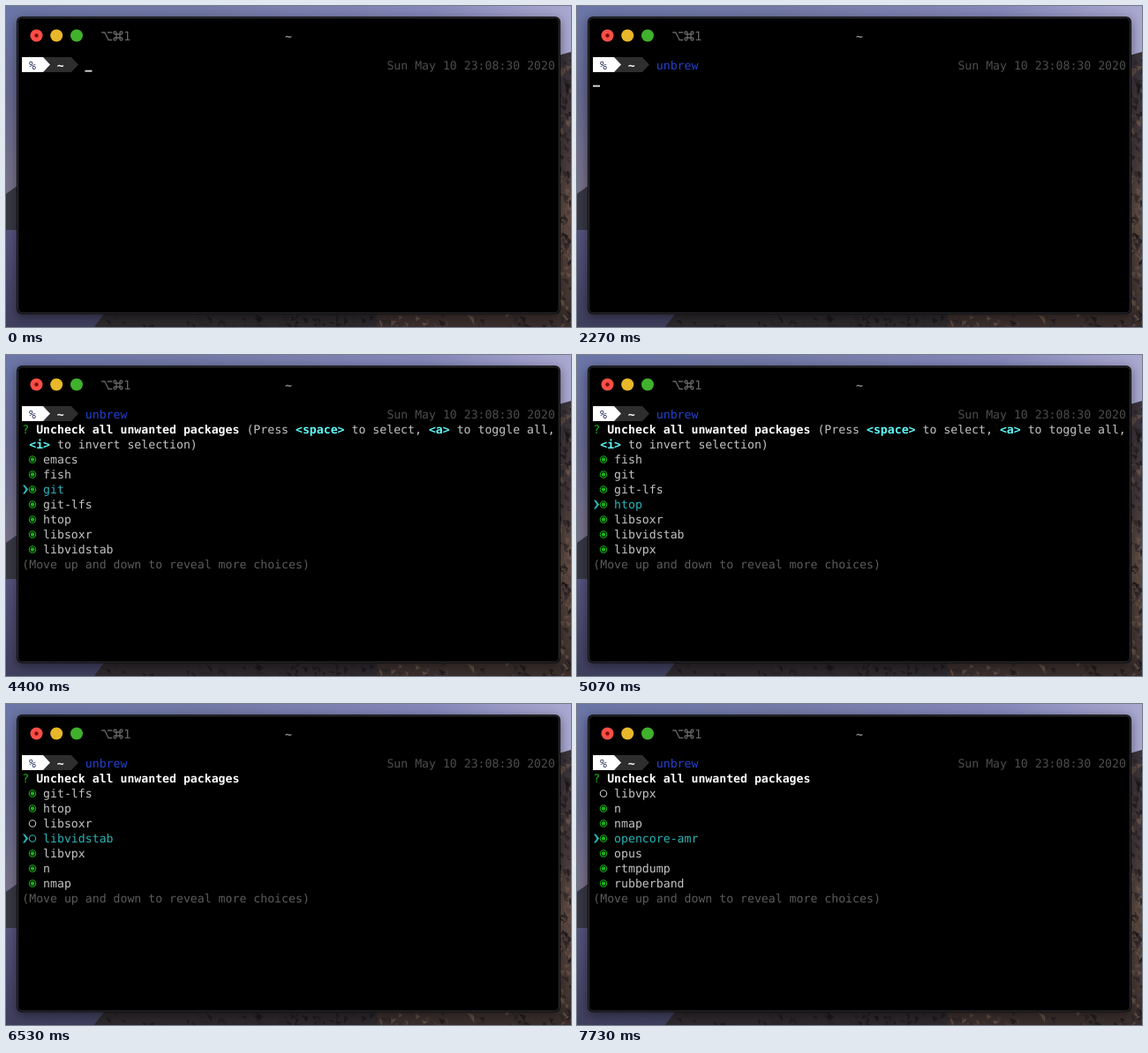
An HTML page that plays this animation: 640 px wide and 364 px high, repeating every 8 s.

```html
<!DOCTYPE html>
<html lang="en">
<head>
<meta charset="utf-8">
<title>Terminal</title>
<style>
  html, body { margin: 0; height: 100%; overflow: hidden; background: #000; }
  svg { display: block; width: 640px; height: 364px; }
  text {
    font: 13.19px "DejaVu Sans Mono", "Noto Sans Mono", monospace;
    text-rendering: geometricPrecision;
    white-space: pre;
    fill: #c4c4c4;
  }
  .window { filter: drop-shadow(0 3px 6px rgba(0, 0, 0, .45)); }
  .bold { font-weight: bold; fill: #fff; }
  .key { font-weight: bold; fill: #5ffafa; }
  .date { fill: #4d4d4d; }
  .hint { fill: #5b5b5b; }
  .cmd { fill: #2342cf; }
  .ok { fill: #18b218; }
  .cur { fill: #2bb3b5; }
  .ring { fill: none; stroke: #c4c4c4; stroke-width: 1.1; }
  .ring.ok { stroke: #18b218; fill: none; }
  .ring.cur { stroke: #2bb3b5; fill: none; }
  .bar { fill: #d0d0d0; }
  .icon { fill: none; stroke: #666; stroke-width: 1.3; }
</style>
</head>
<body>
<svg viewBox="0 0 640 364">
  <defs>
    <linearGradient id="top">
      <stop offset="0" stop-color="#6b75a6"/>
      <stop offset=".35" stop-color="#7379a6"/>
      <stop offset=".75" stop-color="#8487b8"/>
      <stop offset="1" stop-color="#a9a8d0"/>
    </linearGradient>
    <linearGradient id="left" x2="0" y2="1">
      <stop offset="0" stop-color="#6b75a6"/>
      <stop offset=".25" stop-color="#666890"/>
      <stop offset=".55" stop-color="#77728a"/>
      <stop offset=".7" stop-color="#54527c"/>
      <stop offset="1" stop-color="#3f3e5c"/>
    </linearGradient>
    <linearGradient id="cliff" x2="0" y2="1">
      <stop offset="0" stop-color="#39333a"/>
      <stop offset=".35" stop-color="#43383a"/>
      <stop offset=".6" stop-color="#5f4c44"/>
      <stop offset="1" stop-color="#382d2b"/>
    </linearGradient>
  </defs>
  <rect width="640" height="364" fill="url(#top)"/>
  <path d="M0 12H14V348H120V364H0Z" fill="url(#left)"/>
  <path d="M0 213L14 203V254H0Z" fill="#383844"/>
  <path d="M626 56L640 52V364H100L112 348H626Z" fill="url(#cliff)"/>
  <path d="M100 364L112 348H420V364Z" fill="#2c282c"/>
  <g id="stones"></g>

  <rect class="window" x="12" y="12" width="616" height="337.5" rx="6" fill="#0b0b0d"/>
  <rect x="13.5" y="13.5" width="613" height="334.5" rx="5" fill="#000" stroke="#343438"/>
  <circle cx="34.5" cy="33.5" r="7" fill="#fb4f47"/>
  <circle cx="34.5" cy="33.5" r="2.2" fill="#7d0d09"/>
  <circle cx="57.2" cy="33.5" r="7" fill="#e8b82a"/>
  <circle cx="80" cy="33.5" r="7" fill="#40b12d"/>
  <path class="icon" d="M108.3 30h3.5l4.3 8.5h4.2M115 30h5.3"/>
  <path class="icon" d="M125 30.5v7a1.5 1.5 0 1 1-1.5-1.5h7a1.5 1.5 0 1 1-1.5 1.5v-7a1.5 1.5 0 1 1 1.5 1.5h-7a1.5 1.5 0 1 1 1.5-1.5z"/>
  <text x="133" y="39" style="font-size: 14px; fill: #666">1</text>
  <text x="316" y="38.5" style="font-weight: bold; fill: #8e8e8e">~</text>

  <path d="M42 58H74L82 66.5L74 75H42Z" fill="#2e2e2e"/>
  <path d="M18 58H42L50 66.5L42 75H18Z" fill="#fff"/>
  <text x="26" y="71.5" style="fill: #26305a">%</text>
  <text x="57.8" y="71.5" class="bold">~</text>
  <text x="431.4" y="71.5" class="date">Sun May 10 23:08:30 2020</text>
  <g id="screen"></g>
</svg>
<script>
const LOOP = 8000, CELL = 7.941, LINE = 17, LEFT = 18.3, ROWS = 7;
const packages = ('emacs fish git git-lfs htop libsoxr libvidstab libvpx n nmap ' +
  'opencore-amr opus rtmpdump rubberband').split(' ');

// time in ms and the input that takes effect then
const steps = [
  [130, 'u'], [270, 'n'], [400, 'b'], [670, 'r'], [870, 'e'], [1070, 'w'],
  [1400, 'enter'], [3330, 'menu'],
  [4130, 'down'], [4400, 'down'], [4670, 'down'], [4930, 'down'], [5130, 'down'],
  [5730, 'space'], [6000, 'down'], [6400, 'space'], [6730, 'down'], [7070, 'space'],
  [7330, 'down'], [7530, 'down'], [7670, 'down']
];

const screen = document.getElementById('screen');
const esc = s => s.replace(/</g, '&lt;').replace(/>/g, '&gt;');
const text = (row, col, str, cls = '') =>
  `<text x="${LEFT + col * CELL}" y="${71.5 + row * LINE}" class="${cls}">${esc(str)}</text>`;
const cursor = (row, col) =>
  `<rect class="bar" x="${18 + col * CELL}" y="${72.7 + row * LINE}" width="8" height="2"/>`;

function stateAfter(count) {
  const s = { typed: '', entered: false, menu: false, at: 0, off: new Set() };
  for (const [, key] of steps.slice(0, count)) {
    if (key === 'enter') s.entered = true;
    else if (key === 'menu') s.menu = true;
    else if (key === 'down') s.at++;
    else if (key === 'space') s.off.add(s.at);
    else s.typed += key;
  }
  return s;
}

function choice(row, name, current, checked) {
  const y = 67 + row * LINE;
  const tint = checked ? 'ok' : current ? 'cur' : '';
  let out = text(row, 3, name, current ? 'cur' : '');
  out += `<circle class="ring ${tint}" cx="30" cy="${y + .5}" r="3.7"/>`;
  if (checked) out += `<circle class="ok" cx="30" cy="${y + .5}" r="2.2"/>`;
  if (current) out += `<path class="cur" d="M19 ${y - 4.5}h2.2l4 5l-4 5h-2.2l3.4-5z"/>`;
  return out;
}

function menu(s) {
  let out = text(1, 0, '?', 'ok') + text(1, 2, 'Uncheck all unwanted packages', 'bold');
  let row = 2;
  if (!s.off.size) {
    out += text(1, 32, '(Press') + text(1, 39, '<space>', 'key') +
      text(1, 47, 'to select,') + text(1, 58, '<a>', 'key') +
      text(1, 62, 'to toggle all,') + text(2, 1, '<i>', 'key') +
      text(2, 5, 'to invert selection)');
    row = 3;
  }
  const top = Math.max(0, s.at - 3);
  for (let i = top; i < top + ROWS; i++)
    out += choice(row++, packages[i], i === s.at, !s.off.has(i));
  return out + text(row, 0, '(Move up and down to reveal more choices)', 'hint');
}

function render(count) {
  const s = stateAfter(count);
  let out = text(0, 9, s.typed, 'cmd');
  if (s.menu) out += menu(s);
  else out += s.entered ? cursor(1, 0) : cursor(0, 9 + s.typed.length);
  screen.innerHTML = out;
}

function scatterStones() {
  let seed = 7;
  const rnd = () => (seed = seed * 16807 % 2147483647) / 2147483647;
  const tones = ['#1a1618', '#2a2426', '#6e584c', '#4a3c3a'];
  let out = '';
  for (let i = 0; i < 260; i++) {
    const side = i < 150;
    const x = side ? 626 + rnd() * 14 : 112 + rnd() * 525;
    const y = side ? 58 + rnd() * 300 : 349 + rnd() * 14;
    const tone = tones[Math.floor(rnd() * (side || x > 420 ? 4 : 2))];
    out += `<path d="M${x} ${y}l${2 + rnd() * 6} ${rnd() * 4}l${-rnd() * 6} ${2 + rnd() * 5}z" fill="${tone}" opacity=".7"/>`;
  }
  document.getElementById('stones').innerHTML = out;
}

let shown = -1;
const start = performance.now();
function tick() {
  const t = (performance.now() - start) % LOOP;
  const count = steps.filter(([at]) => at <= t).length;
  if (count !== shown) render(shown = count);
  requestAnimationFrame(tick);
}
scatterStones();
tick();
</script>
</body>
</html>
```
